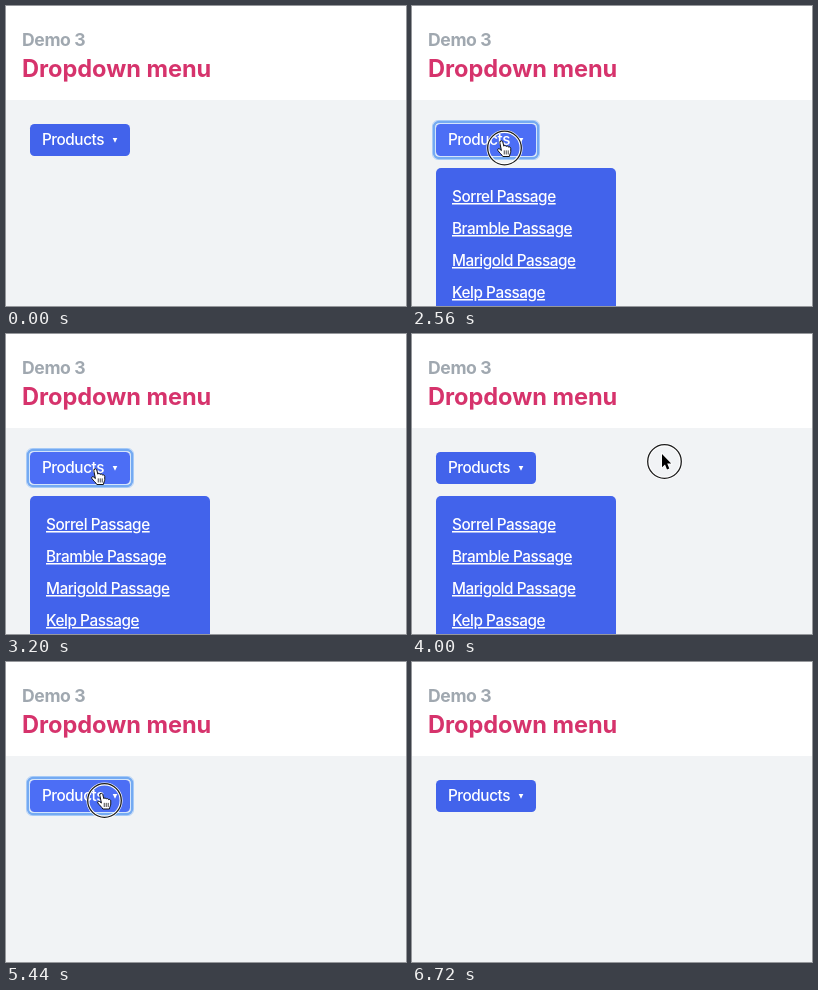
Recreate the animation shown at these times as an HTML page. Size 400 by 300 pixels, loop 7360 ms.

```html
<!DOCTYPE html>
<html lang="en">
<head>
<meta charset="utf-8">
<title>Dropdown menu</title>
<style>
  html, body { margin: 0; width: 100%; height: 100%; overflow: hidden; background: #f1f3f5; }
  svg { display: block; width: 400px; height: 300px; }
  text { font-family: Inter, "Liberation Sans", sans-serif; }
  .body { font-size: 15.3px; font-weight: 450; letter-spacing: -.44px; fill: #fff; }
  .link { text-decoration: underline; text-decoration-thickness: 1px; }
</style>
</head>
<body>
<svg viewBox="0 0 400 300">
  <rect width="400" height="300" fill="#f1f3f5"/>
  <rect width="400" height="94" fill="#fff"/>
  <text x="16" y="40" font-size="17.6" font-weight="700" letter-spacing="-.4" fill="#a0a8b0">Demo 3</text>
  <text x="16" y="71" font-size="23.6" font-weight="700" letter-spacing="-.04" fill="#d6336c">Dropdown menu</text>

  <g id="focus" fill="none">
    <rect x="20.5" y="114.5" width="107" height="39" rx="5.5" stroke="#b5d2f8"/>
    <rect x="22" y="116" width="104" height="36" rx="5" stroke="#74aaf2" stroke-width="2.4"/>
    <rect x="23.5" y="117.5" width="101" height="33" rx="4.5" stroke="#d3e4fb"/>
  </g>
  <rect id="button" x="24" y="118" width="100" height="32" rx="4.5"/>
  <text class="body" x="36" y="139">Products</text>
  <path d="M106.7 132H111.3L109 136.8Z" fill="#fff"/>

  <g id="menu">
    <rect x="24" y="162" width="180" height="150" rx="5" fill="#4263eb"/>
  </g>

  <g id="ring" fill="none">
    <circle r="16.6" stroke="#fff" stroke-width="3"/>
    <circle r="16.8" stroke="#1c1c1c" stroke-width="1.3"/>
  </g>
  <path id="arrow" d="M0 0V13.2L3 10.4L5 15.4L7.3 14.5L5.2 9.6H9.2Z"
    fill="#000" stroke="#fff" stroke-width="1.6" paint-order="stroke"/>
  <g id="hand">
    <g transform="scale(1.1)" stroke="#111" stroke-width=".9" stroke-linecap="round" stroke-linejoin="round">
      <path fill="#fff" d="M3 1.2C3.6.4 4.9.6 5.2 1.6L6.2 5.6c.2-.9 2-.8 2.2.3c.5-.7 2-.4 2.1.6c.6-.5 2-.1 2 1v3c0 1.5-1 2.5-1.2 4.5h-6C4.4 13.3 2.2 11.5.8 9.6C0 8.4 1.4 7.4 2.4 8.2L4 9.6L2.6 2.6C2.5 2 2.6 1.6 3 1.2Z"/>
      <path fill="none" stroke-width=".7" d="M6.6 9.8v3M8.4 9.8v3M10.2 9.8v3"/>
    </g>
  </g>
</svg>
<script>
const LOOP = 7360;
const byId = id => document.getElementById(id);
const [focusRing, button, menu, ring, arrow, hand] =
  ["focus", "button", "menu", "ring", "arrow", "hand"].map(byId);

["Sorrel Passage", "Bramble Passage", "Marigold Passage", "Kelp Passage"].forEach((label, i) => {
  const link = document.createElementNS("http://www.w3.org/2000/svg", "text");
  link.setAttribute("class", "body link");
  link.setAttribute("x", 40);
  link.setAttribute("y", 196 + 32 * i);
  link.textContent = label;
  menu.append(link);
});

const arrowAt = (x, y, alpha = 1) => ({ arrow: [x, y], hand: null, alpha });
const handAt = (x, y) => ({ arrow: null, hand: [x, y] });
const press = { ring: true };
const open = { ring: false, menu: true };
const closed = { ring: false, menu: false };

// Each step changes only the listed parts of the state.
const steps = [
  [0, { arrow: null, hand: null, alpha: 1, focus: false, ...closed }],
  [320, arrowAt(118, 132, .5)],
  [480, arrowAt(118, 132)],
  [640, handAt(94.5, 133.5)],
  [1280, handAt(85, 134)],
  [1440, { ...press, focus: true }],
  [1600, open],
  [2560, press],
  [2720, closed],
  [3040, press],
  [3200, open],
  [3680, arrowAt(235, 123)],
  [3840, arrowAt(250, 120)],
  [4000, { ...press, focus: false }],
  [4160, closed],
  [4960, arrowAt(235, 120)],
  [5120, arrowAt(122, 122)],
  [5280, handAt(96, 127)],
  [5440, { ...handAt(91, 130.5), ...press, focus: true }],
  [5600, open],
  [5920, arrowAt(128, 120)],
  [6080, arrowAt(232, 107)],
  [6240, { ...arrowAt(234, 108), ...closed, focus: false }],
  [6560, arrowAt(324, 156)],
  [6720, { arrow: null }]
];

function show(el, visible) {
  el.setAttribute("visibility", visible ? "visible" : "hidden");
}

function place(el, pos) {
  show(el, pos);
  if (pos) el.setAttribute("transform", `translate(${pos})`);
}

function render(time) {
  const state = Object.assign({}, ...steps.filter(([at]) => at <= time).map(step => step[1]));
  const cursor = state.hand || state.arrow;
  const offset = state.hand ? [7.5, 8] : [2.5, 7.5];

  show(focusRing, state.focus);
  button.setAttribute("fill", state.focus ? "#4c6ef5" : "#4263eb");
  show(menu, state.menu);
  place(arrow, state.arrow);
  arrow.setAttribute("opacity", state.alpha);
  place(hand, state.hand);
  place(ring, state.ring && cursor.map((v, i) => v + offset[i]));
}

const start = performance.now();
function tick() {
  render((performance.now() - start) % LOOP);
  requestAnimationFrame(tick);
}
tick();
</script>
</body>
</html>
```
